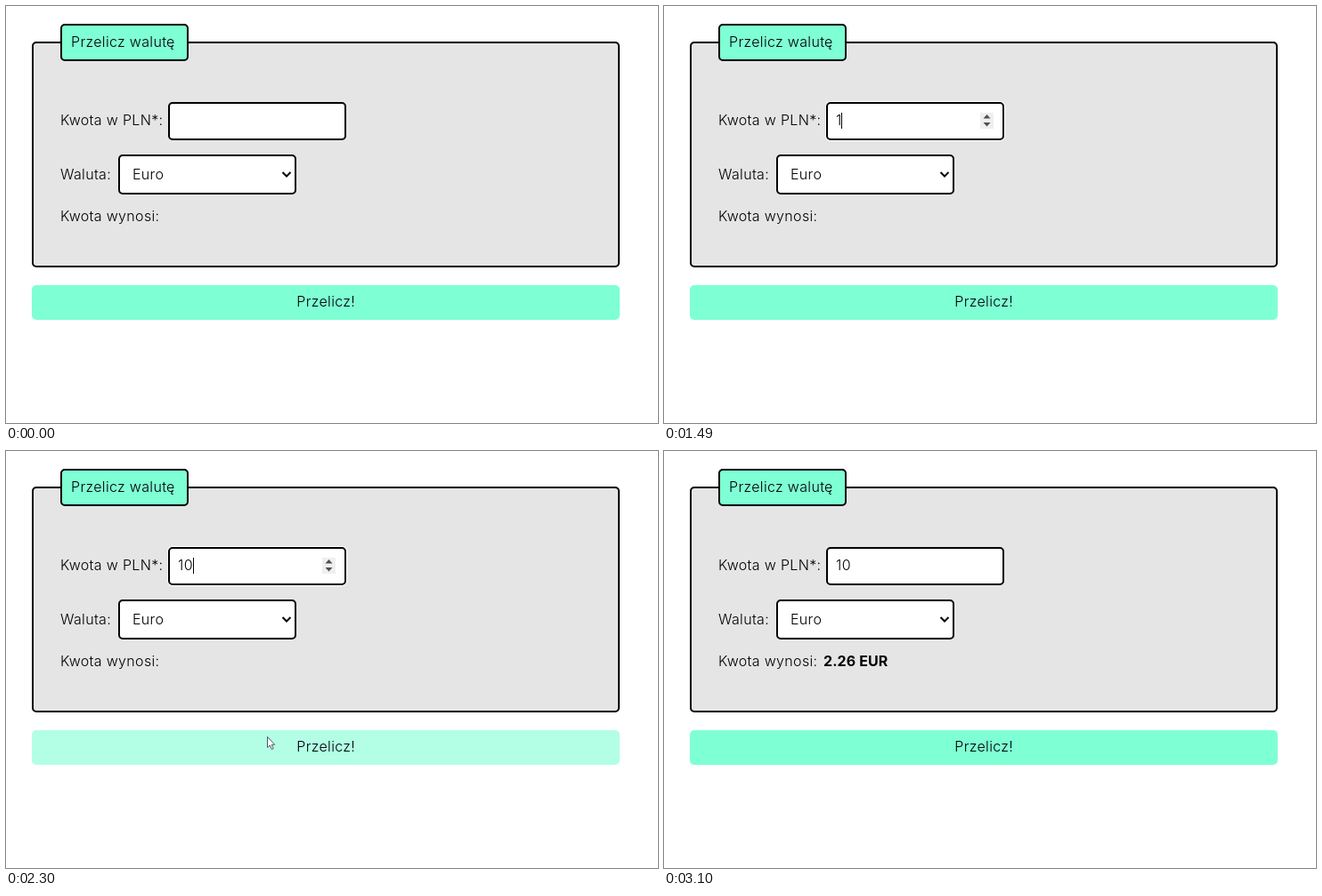
Recreate the animation shown at these times as an HTML page. Size 732x469 px, loop 3760 ms.

```html
<!DOCTYPE html>
<html lang="pl">
<head>
<meta charset="utf-8">
<title>Przelicz walutę</title>
<style>
  html, body { margin: 0; width: 100%; height: 100%; overflow: hidden; background: #fff; }
  svg { display: block; }
  text { font: 300 16px Inter, sans-serif; letter-spacing: .33px; white-space: pre; }
  .bold { font-weight: 700; letter-spacing: .1px; }
  .box { stroke: #000; stroke-width: 2; fill: #fff; }
  .aqua { fill: #7fffd4; }
</style>
</head>
<body>
<svg width="732" height="469" viewBox="0 0 732 469">
  <rect class="box" x="30" y="41" width="658" height="252" rx="4" style="fill:#e5e5e5"/>
  <rect class="box aqua" x="62" y="21" width="142" height="40" rx="4"/>
  <text x="73" y="46">Przelicz walutę</text>

  <text x="61" y="134">Kwota w PLN*:</text>
  <rect id="ring" x="181" y="107" width="202" height="45" rx="6" fill="#fff"/>
  <rect class="box" x="183" y="109" width="198" height="41" rx="4"/>
  <text id="amount" x="193" y="134"></text>
  <g id="focus">
    <rect id="caret" y="120" width="1" height="18"/>
    <rect x="355" y="120" width="15" height="18" fill="#efefef"/>
    <path d="M358.5 126.5l4-4.5 4 4.5zM358.5 131l4 4.5 4-4.5z" fill="#505050"/>
  </g>

  <text x="61" y="195">Waluta:</text>
  <rect class="box" x="127" y="168" width="198" height="43" rx="4"/>
  <text x="142" y="195">Euro</text>
  <path d="M310.5 187l4.5 4.5 4.5-4.5" fill="none" stroke="#000" stroke-width="2"/>

  <text x="61" y="242">Kwota wynosi:</text>
  <text id="result" class="bold" x="179" y="242">2.26 EUR</text>

  <rect id="button" x="29" y="314" width="660" height="39" rx="5"/>
  <text x="359.2" y="338" text-anchor="middle">Przelicz!</text>

  <path id="arrow" d="M.5.5v12l2.8-2.5 2 4.5 1.9-.9-2-4.3h3.5z" fill="#fff" stroke="#445" stroke-width=".9"/>
  <path id="beam" d="M-3-7.5h2.5l.5.5.5-.5H3M0-7V7M-3 7.5h2.5L0 7l.5.5H3" fill="none" stroke="#222"/>
</svg>
<script>
  const LOOP = 3760;
  const el = id => document.getElementById(id);
  const show = (id, on) => el(id).style.display = on ? '' : 'none';

  // Each step: start time, then its value, held until the next step.
  const pointer = [
    [0], [670, 'arrow', 347, 351], [750, 'arrow', 357, 292], [830, 'arrow', 300, 205],
    [910, 'beam', 232, 143], [990, 'beam', 206, 131], [1170],
    [2060, 'beam', 222, 143], [2140, 'arrow', 276, 226], [2220, 'arrow', 302, 287],
    [2300, 'arrow', 293, 321], [2370, 'arrow', 290, 336], [2450, 'arrow', 289, 341], [3100]
  ];
  const typed = [[0, '', 194], [1490, '1', 199], [1980, '10', 210]];
  const button = [[0, '#7fffd4'], [2300, '#b3ffe6'], [2520, '#ccffee'], [2600, '#b3ffe6'], [3100, '#7fffd4']];
  const at = (steps, t) => steps.findLast(step => step[0] <= t);

  function draw(now) {
    const t = now % LOOP;
    const [, shape, x, y] = at(pointer, t);
    for (const id of ['arrow', 'beam']) show(id, id === shape);
    if (shape) el(shape).setAttribute('transform', `translate(${x} ${y})`);

    const [, text, caretX] = at(typed, t);
    el('amount').textContent = text;
    el('caret').setAttribute('x', caretX);
    const focused = t >= 1170 && t < 2520;
    show('focus', focused);
    show('ring', focused);
    show('result', t >= 2600);
    el('button').setAttribute('fill', at(button, t)[1]);
    requestAnimationFrame(draw);
  }
  const start = performance.now();
  const frame = draw;
  draw = now => frame(Math.max(0, now - start));
  draw(start);
</script>
</body>
</html>
```
